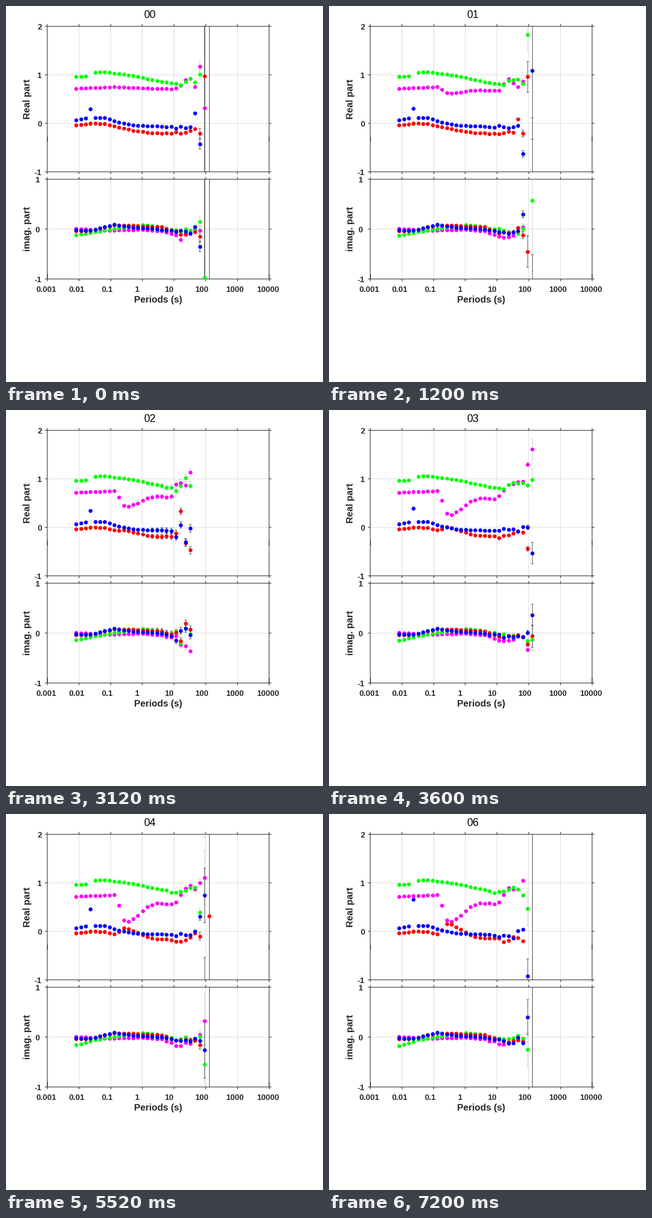
Animation, 688 px wide and 814 px high, one loop 8 s. Source, as a matplotlib script:

```python
import numpy as np
import matplotlib.pyplot as plt
from matplotlib.animation import FuncAnimation
from matplotlib.collections import LineCollection
from matplotlib.patches import Rectangle

W, H, DPI = 688, 814, 100
PX = 72 / DPI                      # points per pixel
LEFT, RIGHT, DECADE = 89.5, 571.0, 68.8
X0, DX, COUNT = 152.2, 10.33, 29   # first period, spacing, number of periods
INK, GRID = "#262626", "#d6d6d6"
COLORS = {"m": "#ff00ff", "g": "#00ff00", "r": "#ff0000", "b": "#0000ff"}
OFF = 250                          # a value beyond either panel

plt.rcParams["path.snap"] = False
plt.rcParams["font.family"] = "Liberation Sans"

index = np.arange(COUNT)
xs = X0 + DX * index


def through(*points):
    """Values at every period on straight lines through (index, value) points."""
    return np.interp(index, *zip(*points))


class Panel:
    def __init__(self, top, bottom, zero, unit, levels):
        self.top, self.bottom, self.zero, self.unit = top, bottom, zero, unit
        self.levels = levels

    def y(self, hundredths):
        return self.zero - np.asarray(hundredths, float) * self.unit / 100


real = Panel(44, 359, 254.1, 105, (200, 100, 0, -100))
imag = Panel(375, 591, 483, 108, (100, 0, -100))

# The resonance near half a second: 0 to 1, steep rise, slow recovery.
RESONANCE = through((8, 0), (9, 0.4), (10, 0.95), (11, 1), (13, 0.75),
                    (15, 0.4), (17, 0.25), (20, 0.25), (23, 0))


def real_curves(step):
    depth = 54 * np.sin(np.pi / 2 * min(step / 4, 1)) ** 1.6
    m = through((0, 72), (8, 75), (21, 70), (23, 89), (25, 92))
    g = through((0, 96), (2, 97), (4, 105), (6, 106), (12, 98), (16, 90),
                (20, 81), (22, 81), (24, 91))
    r = through((0, -4), (3, 0), (6, -1), (8, -6), (12, -15), (16, -20),
                (22, -21), (25, -11))
    b = through((0, 7), (2, 11), (6, 12), (9, 2), (12, -4), (17, -6),
                (24, -8), (25, -2))
    g[3] = -1
    b[3] = 30 + step ** 2
    return {"m": m - depth * RESONANCE, "g": g,
            "r": r + depth * step / 12 * RESONANCE, "b": b}


def imag_curves(step):
    return {
        "m": through((0, 1), (3, -1), (6, -3), (14, -1), (18, -4), (22, -17), (25, -7)),
        "g": through((0, -12 - step), (4, -6), (8, 1), (14, 8), (17, 6), (19, 0), (25, -6)),
        "r": through((0, -4), (3, -3), (8, 8), (12, 7), (18, 4), (22, -9), (25, -6)),
        "b": through((0, -2), (3, -3), (8, 9), (12, 3), (16, 1), (24, -8), (25, -3))}


steps = []


def add_step(first, half, growth, real_ends, imag_ends):
    """Long periods scatter; the last values, from index `first`, are given.

    Error bars are `half` high at index 26 and grow by `growth` per period.
    """
    step = len(steps)
    rng = np.random.default_rng(step)
    error = half * growth ** (index - 26.0)
    scatter = np.interp(index, (17, 25), (0, 3))
    shown = []
    for panel, curves, ends in ((real, real_curves(step), real_ends),
                                (imag, imag_curves(step), imag_ends)):
        for key, end in zip(COLORS, ends):
            values = curves[key] + scatter * rng.normal(size=COUNT)
            values[first:] = OFF
            values[first:first + len(end)] = end
            curves[key] = values
        shown.append((curves, error))
    steps.append(shown)


add_step(25, 10, 40,
         ([75, 117, 32], [85, 101], [-11, -21, 97], [21, -43]),
         ([0, -3], [-2, 15, -97], [-6, -15], [5, -35]))
add_step(25, 7, 4.5,
         ([75, 86], [91, 82, 183], [9, -21, 96, -130], [-5, -63, OFF, 109]),
         ([-5, 4], [-9, 1, OFF, 57], [3, -12, -45, -193], [-4, 30]))
add_step(21, 9, 1.08,
         ([89, 92, 87, 113], [75, 86, 102, 86], [-12, 33, -32, -47], [-20, 5, -30, -2]),
         ([-6, -23, -26, -36], [4, -20, 8, -2], [1, -16, 19, 7], [-15, 5, 9, -4]))
add_step(26, 1, 4.7,
         ([94, 130, 161], [92, 87, 98], [-10, -44, -125], [1, 0, -53]),
         ([-8, -33, -13], [-8, -16, -13], [-7, -22, -6], [-7, 1, 36]))
add_step(26, 8, 7,
         ([100, 111], [39], [-10, -110, 32], [31, 74]),
         ([5, 32], [1, -55], [-16], [-7, -26]))
add_step(26, 0.8, 4.6,
         ([96, 95, 123], [85, 86, 81], [-10, -8, -47], [4, 6, -20]),
         ([-8, -8, -15], [-8, 11, 10], [-10, -10, -78], [-11, -6, 5]))
add_step(26, 2.5, 14,
         ([105], [74, 47], [-20], [4, -92]),
         ([-8], [-3, -25], [-9], [-12, 40]))

fig = plt.figure(figsize=(W / DPI, H / DPI), dpi=DPI, facecolor="white")
ax = fig.add_axes([0, 0, 1, 1])
ax.set_xlim(0, W)
ax.set_ylim(H, 0)
ax.axis("off")


def line(x1, y1, x2, y2, color=INK, width=1.3, z=2):
    ax.plot([x1, x2], [y1, y2], color=color, lw=width * PX, zorder=z,
            solid_capstyle="butt")


def label(x, y, text, size=17.5, weight="bold", color=INK, **kw):
    return ax.text(x, y, text, size=size * PX, weight=weight, color=color,
                   ha="center", va="baseline", **kw)


def draw_frame(panel):
    top, bottom = panel.top, panel.bottom
    for k in range(8):
        x = LEFT + DECADE * k
        if 0 < k < 7:
            x = int(x) + 0.5
            line(x, top, x, bottom, GRID, 1, 1)
        line(x, top - 5, x, top)
        line(x, bottom, x, bottom + 5)
    for y in np.linspace(top, bottom, len(panel.levels)):
        if top < y < bottom:
            line(LEFT, y, RIGHT, y, GRID, 1, 1)
        line(LEFT - 5, y, LEFT, y)
        line(RIGHT, y, RIGHT + 5, y)
    ax.add_patch(Rectangle((LEFT, top), RIGHT - LEFT, bottom - top, fill=False,
                           ec=INK, lw=1.3 * PX, zorder=2))


def make_artists(panel):
    clip = Rectangle((LEFT, panel.top), RIGHT - LEFT, panel.bottom - panel.top,
                     transform=ax.transData)
    bars = {}
    for keys, color, z in (("mg", "#bdbdbd", 3), ("rb", "#202020", 4)):
        bars[keys] = LineCollection([], colors=color, linewidths=0.9 * PX, zorder=z)
        ax.add_collection(bars[keys], autolim=False)
        bars[keys].set_clip_path(clip)
    dots = {key: ax.plot([], [], "o", ms=8.5 * PX, mew=0, color=c, zorder=5 + n)[0]
            for n, (key, c) in enumerate(COLORS.items())}
    return panel, bars, dots


def bar_segments(panel, values, error):
    segments = []
    for x, v, e in zip(xs, values, error):
        if e < 4:                  # hidden behind the marker
            continue
        low, high = panel.y(v - e), panel.y(v + e)
        segments.append([(x, low), (x, high)])
        segments += [[(x - 2.7, y), (x + 2.7, y)] for y in (low, high)]
    return segments


for p in (real, imag):
    draw_frame(p)
for edge in (LEFT + 0.5, RIGHT):
    line(edge, 283, edge, 293, width=1.6)
    line(edge, 580, edge, 591, width=1.6)

for p, x in ((real, 73), (imag, 68.5)):
    for v in p.levels:
        label(69.5 if v < 0 else x, p.y(v) + 6.6, str(v // 100))
for text, x in (("0.001", 87), ("0.01", 153), ("0.1", 219), ("1", 284.5),
                ("10", 354.5), ("100", 426), ("1000", 497), ("10000", 569)):
    label(x, 619.3, text)
label(330, 642.4, "Periods (s)", 20.3)
for text, y in (("Real part", 202), ("imag. part", 483)):
    label(51.5, y, text, 20.3, rotation=90, rotation_mode="anchor")
title = label(311.5, 26, "00", 23, "normal", "black")

panels = [make_artists(real), make_artists(imag)]


def update(k):
    step = min(k // 3, 6)
    title.set_text(f"{step:02d}")
    for (panel, bars, dots), (curves, error) in zip(panels, steps[step]):
        for keys, coll in bars.items():
            coll.set_segments([s for key in keys
                               for s in bar_segments(panel, curves[key], error)])
        for key, dot in dots.items():
            y = panel.y(curves[key])
            inside = (y > panel.top) & (y < panel.bottom)
            dot.set_data(xs[inside], y[inside])
    return []


anim = FuncAnimation(fig, update, frames=20, interval=400, repeat=True,
                     repeat_delay=0, cache_frame_data=False)
plt.show()
```
